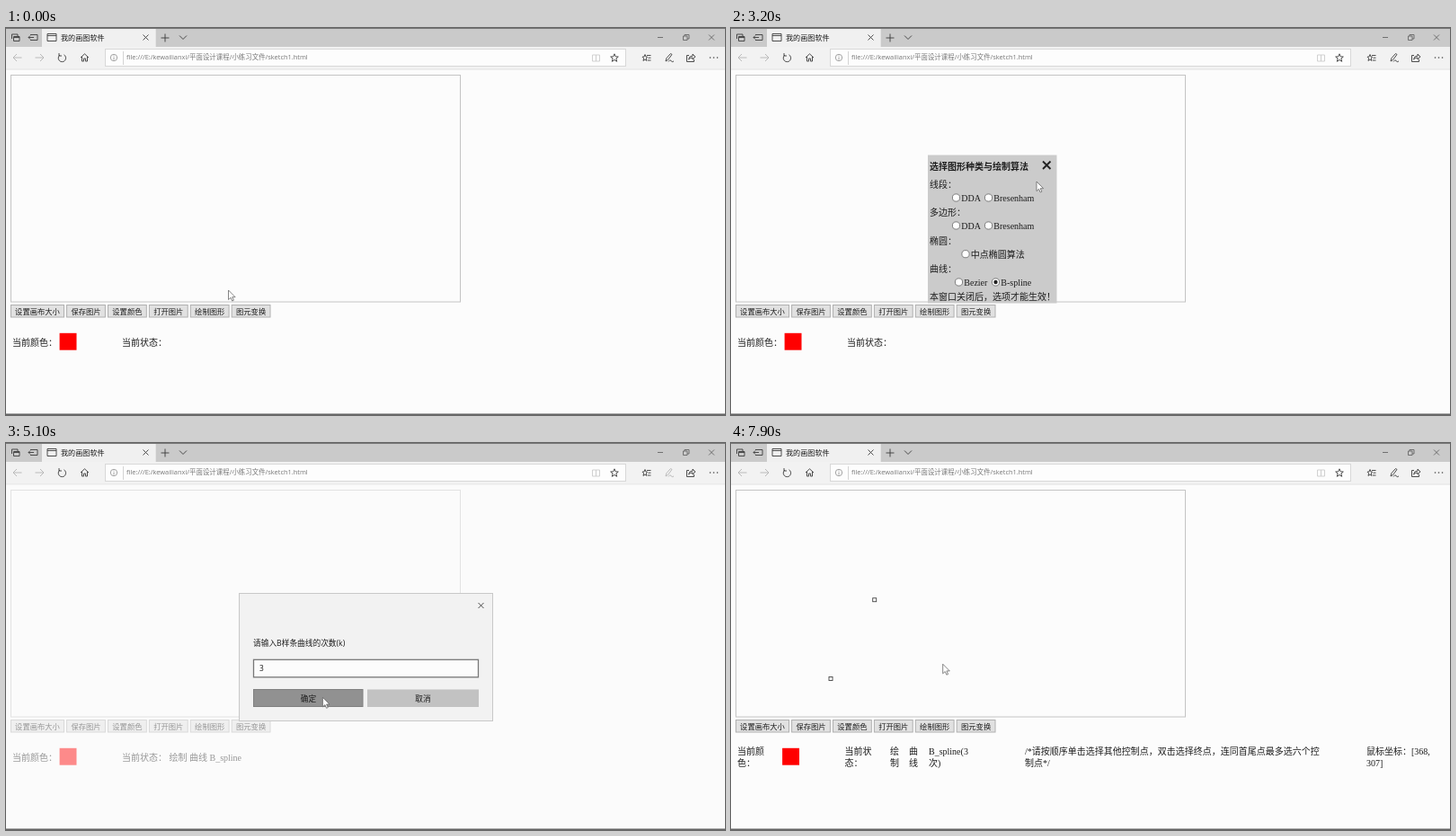
An HTML page for the animation above (8 s loop, 800 by 431 pixels).

```html
<!DOCTYPE html>
<html lang="zh-CN">
<head>
<meta charset="utf-8">
<title>画图</title>
<style>
html, body { margin: 0; width: 100%; height: 100%; overflow: hidden; background: #fcfcfc; }
svg { display: block; width: 100%; height: 100%; }
text { font: 10px "Liberation Serif", "Noto Sans CJK SC", serif; fill: #1c1c1c; }
.ui text { font: 8.3px "Open Sans", "Noto Sans CJK SC", sans-serif; }
.icon { fill: none; stroke: #3c3c3c; stroke-width: .9; }
.dim { stroke: #b4b4b4; }
.mid { text-anchor: middle; }
</style>
</head>
<body>
<svg viewBox="0 0 800 431">
  <rect width="800" height="431" fill="#fcfcfc"/>

  <!-- browser window -->
  <g class="ui">
    <rect width="800" height="21" fill="#cacaca"/>
    <rect width="800" height="1" fill="#777"/>
    <rect x="40" y="1" width="126.700" height="20" fill="#f0f0f0"/>
    <rect y="21" width="800" height="25" fill="#f2f2f2"/>
    <path d="M0 46H800" stroke="#e2e2e2"/>
    <rect x="110.500" y="23.500" width="579" height="19" fill="#fdfdfd" stroke="#d8d8d8"/>
    <path d="M130.500 26V41" stroke="#d4d4d4"/>
    <text x="61" y="13.500" style="font-size:8.100px">我的画图软件</text>
    <text x="134" y="35" style="font-size:7.450px;fill:#777">file:///E:/kewailianxi/平面设计课程/小练习文件/sketch1.html</text>
    <g class="icon">
      <path d="M6.500 12V7H13V9M8.500 9.500H15V14.500H8.500ZM8.500 10.500H15"/>
      <path d="M27 7.500H35V13.500H27M25 10.500H31M27 8.500L25 10.500 27 12.500"/>
      <path d="M46 6.500H56V14.500H46ZM46 8.500H56"/>
      <path d="M152.500 7.500L158.500 13.500M158.500 7.500L152.500 13.500"/>
      <path d="M172.500 11H181.500M177 6.500V15.500M193 8.500L197 12.500 201 8.500"/>
      <path stroke="#666" d="M725 10.500H731M753.500 9H758V13.500H753.500ZM755 9V7.500H760V12H758M782 7.500L788 13.500M788 7.500L782 13.500"/>
      <path class="dim" d="M17.500 33H8.500M12 29L8 33 12 37M32.500 33H41.500M38 29L42 33 38 37"/>
      <path d="M60 30A4.200 4.200 0 1 0 64.500 29.800M59 28V31H62"/>
      <path d="M83 33L87.500 28.800 92 33M84.500 32V37H86.500V34H88.500V37H90.500V32"/>
      <g stroke="#999"><circle cx="120" cy="33" r="3.700"/><path d="M120 32.500V35.500M120 30.500V31.500"/></g>
      <path stroke="#ccc" d="M652.500 30H656.500V37H652.500ZM656.500 30H660.500V37H656.500Z"/>
      <path d="M677 28.800L678.200 31.800 681.300 32 678.900 34 679.700 37.300 677 35.500 674.300 37.300 675.100 34 672.700 32 675.800 31.800Z"/>
      <path d="M711 29.500L712 32 713.500 32.200 712.300 33.800 712.900 36.500 711 35 709 36.500 709.600 33.800 708 32.200 710 32ZM713 30.500H717.500M714.500 33.200H717.500M714 36H717.500"/>
      <path id="pen" d="M734 37L735 33.500 739.500 28.500 741 29.500 736.500 35.500 734 37M737 37.500Q739 34.500 740 36.500T743 37"/>
      <path d="M760 30.500H757.500V37.500H765.500V35M759.500 35Q760 31 764 31V29L767 32 764 35V33Q761 33 759.500 35"/>
    </g>
    <g fill="#444"><circle cx="783.500" cy="33" r=".8"/><circle cx="787.500" cy="33" r=".8"/><circle cx="791.500" cy="33" r=".8"/></g>
  </g>

  <!-- page -->
  <rect x="5.500" y="52.500" width="500" height="252.500" fill="none" stroke="#c4c4c4"/>
  <g id="buttons" class="ui"></g>
  <rect id="swatch" y="339.800" width="18.900" height="18.900" fill="#f00"/>
  <g id="plainRow">
    <text x="7" y="353.500">当前颜色：</text>
    <text x="129" y="353.500">当前状态：</text>
    <text id="status" x="181.500" y="353.500"></text>
    <text id="hint" x="335" y="353.500">/*请点击画布以选中起点*/</text>
    <text id="coords" x="501" y="353.500"></text>
  </g>
  <g id="wrappedRow"></g>
  <g id="markers" fill="#fff" stroke="#444" stroke-width=".9"></g>

  <!-- shape picker -->
  <g id="panel">
    <rect x="219" y="141.500" width="143.500" height="165" fill="#cbcbcb"/>
    <text x="221" y="158" style="font-weight:bold">选择图形种类与绘制算法</text>
    <path d="M347 148.500L355.500 157M355.500 148.500L347 157" stroke="#222" stroke-width="1.900"/>
    <g id="options"></g>
    <circle id="chosen" cx="294.500" cy="283" r="2.200" fill="#222"/>
    <text x="221" y="302.500">本窗口关闭后，选项才能生效！</text>
  </g>

  <!-- prompt -->
  <rect id="veil" y="46.500" width="800" height="383" fill="#fcfcfc"/>
  <g id="prompt" class="ui">
    <rect x="259.500" y="167.500" width="282" height="142" fill="#f2f2f2" stroke="#c8c8c8"/>
    <path class="icon" d="M525.500 178L531.500 184M531.500 178L525.500 184"/>
    <text x="275" y="226" style="font-size:8.700px">请输入B样条曲线的次数(k)</text>
    <rect x="275.500" y="241.300" width="250" height="19.500" fill="#fcfcfc" stroke="#777" stroke-width="1.300"/>
    <text x="282" y="254">3</text>
    <rect id="ok" x="275.500" y="274.500" width="121.500" height="19" stroke="#808080"/>
    <rect x="402" y="274.500" width="124" height="19.500" fill="#c2c2c2"/>
    <text class="mid" x="336.500" y="287.500" style="font-size:8.700px">确定</text>
    <text class="mid" x="464" y="287.500" style="font-size:8.700px">取消</text>
  </g>

  <rect y="429.500" width="800" height="1.500" fill="#666"/>
  <path id="cursor" d="M0 0V10.600L2.500 8.300 4.200 12 5.900 11.200 4.200 7.700H7.600Z" fill="#fff" stroke="#666" stroke-width=".8"/>
</svg>
<script>
const el = id => document.getElementById(id);
const text = (x, y, s) => `<text x="${x}" y="${y}">${s}</text>`;

el('buttons').innerHTML = ['设置画布大小', '保存图片', '设置颜色', '打开图片', '绘制图形', '图元变换'].map((label, i) => {
  const x = i ? 21.7 + 45.9 * i : 5.5, w = i ? 42.8 : 59;
  return `<rect x="${x}" y="308.500" width="${w}" height="13.500" fill="#e1e1e1" stroke="#b0b0b0"/>
    <text class="mid" x="${x + w / 2}" y="318.600">${label}</text>`;
}).join('');
const drawButton = el('buttons').querySelectorAll('rect')[4];

const option = (x, y, label) =>
  `<circle cx="${x}" cy="${y}" r="4.100" fill="#fff" stroke="#666" stroke-width=".8"/>` + text(x + 5.8, y + 4, label);
el('options').innerHTML =
  ['线段', '多边形', '椭圆', '曲线'].map((s, i) => text(221, 178.3 + 31.1 * i, s + '：')).join('') +
  [189, 220].map(y => option(250.5, y, 'DDA') + option(286.5, y, 'Bresenham')).join('') +
  option(261, 251.7, '中点椭圆算法') + option(253.5, 283, 'Bezier') + option(294.5, 283, 'B-spline');

const twoLines = (x, first, second) => text(x, 347, first) + text(x, 359.7, second);
const wrappedLabels =
  twoLines(7, '当前颜', '色：') + twoLines(126.5, '当前状', '态：') +
  twoLines(177, '绘', '制') + twoLines(198, '曲', '线') + twoLines(220, 'B_spline(3', '次)') +
  twoLines(327, '/*请按顺序单击选择其他控制点，双击选择终点，连同首尾点最多选六个控', '制点*/');

// cursor path: time, x, y
const path = [
  [0, 247.5, 292], [200, 247.5, 292], [400, 258, 284], [1000, 349, 354], [1100, 340, 361],
  [1500, 230, 315], [1600, 230, 315], [1900, 294.5, 270], [2400, 294, 281], [2700, 295, 281],
  [3200, 340, 171], [3500, 350, 152], [3800, 350, 153], [4300, 373, 281.5], [4700, 373, 281.5],
  [5200, 350, 283.5], [5500, 349.5, 283.5], [6200, 110.5, 262], [6400, 110.5, 262],
  [7200, 159, 174.5], [7400, 159, 174.5], [7900, 235.7, 246.2]
];
// click time, x, y
const points = [[6400, 111, 262.5], [7400, 159.7, 174.7]];

const ramp = (t, from, to) => Math.min(1, Math.max(0, (t - from) / (to - from)));
const show = (id, on) => el(id).style.display = on ? '' : 'none';

function cursorAt(t) {
  const i = Math.max(1, path.findIndex(k => k[0] >= t));
  const [t0, x0, y0] = path[i - 1], [t1, x1, y1] = path[i];
  const p = ramp(t, t0, t1), e = p * p * (3 - 2 * p);
  return [x0 + (x1 - x0) * e, y0 + (y1 - y0) * e];
}

function draw(t) {
  const [x, y] = cursorAt(t);
  el('cursor').setAttribute('transform', `translate(${x} ${y})`);

  const overDraw = t < 1900 && x > 205 && x < 249 && y > 308 && y < 323;
  drawButton.setAttribute('stroke', overDraw ? '#0078d7' : '#b0b0b0');
  drawButton.setAttribute('fill', overDraw ? '#e5f1fb' : '#e1e1e1');

  show('panel', t >= 1600 && t < 3600);
  show('chosen', t >= 2500);

  const alpha = ramp(t, 3800, 4100) * (1 - ramp(t, 5300, 5530));
  const scale = 1 + .042 * (1 - alpha);
  el('veil').setAttribute('opacity', .55 * alpha);
  el('prompt').setAttribute('opacity', alpha);
  el('prompt').setAttribute('transform', `translate(400.5 238.5) scale(${scale}) translate(-400.5 -238.5)`);
  el('ok').setAttribute('fill', x > 275 && x < 397 && y > 274 && y < 294 ? '#919191' : '#c2c2c2');
  el('pen').setAttribute('class', t >= 3900 && t < 5600 ? 'dim' : '');

  const wrapped = t >= 6400;
  const mouse = [Math.floor(x * 1.597 - 8.2), Math.floor(y * 1.5875 - 83.5)];
  show('plainRow', !wrapped);
  show('wrappedRow', wrapped);
  show('hint', t >= 5400);
  el('swatch').setAttribute('x', wrapped ? 57.1 : 59.6);
  el('status').textContent = t < 3600 ? '' : '绘制 曲线 B_spline' + (t < 5400 ? '' : '(3次)');
  el('coords').textContent = t < 5700 ? '' : `鼠标坐标：[${mouse}]`;
  if (wrapped) el('wrappedRow').innerHTML = wrappedLabels + twoLines(707, `鼠标坐标：[${mouse[0]},`, `${mouse[1]}]`);

  el('markers').innerHTML = points.filter(p => t >= p[0])
    .map(p => `<rect x="${p[1] - 2}" y="${p[2] - 2}" width="4" height="4"/>`).join('');
}

const start = performance.now();
function tick() {
  const elapsed = (performance.now() - start) % 8000;
  draw(Math.min(7900, Math.floor(elapsed / 100) * 100));
  requestAnimationFrame(tick);
}
tick();
</script>
</body>
</html>
```
